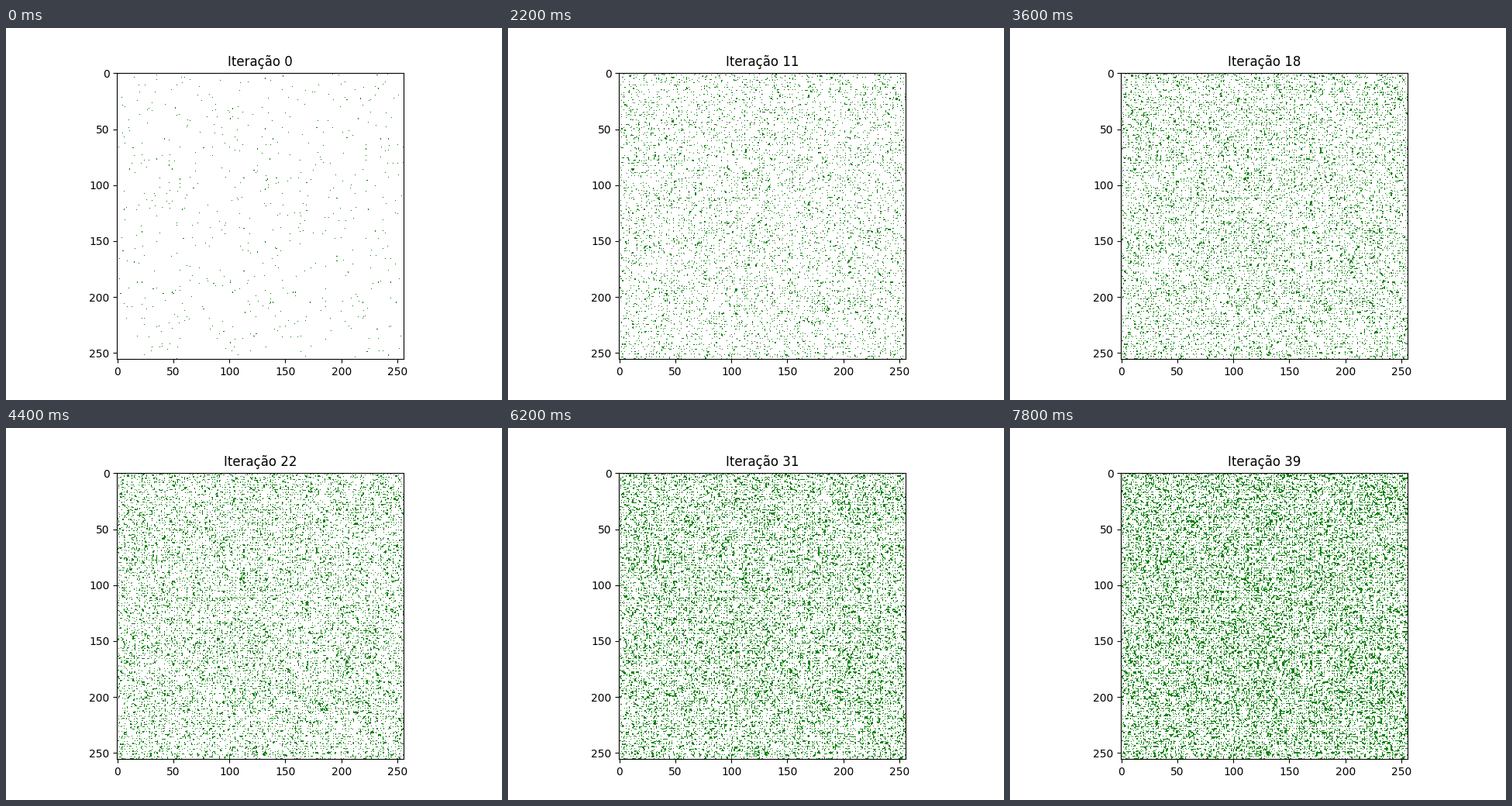
Write a matplotlib script that moves like this. It is 640 by 480 pixels and loops after 8000 ms.

```python
import numpy as np
import matplotlib.pyplot as plt
from matplotlib.animation import FuncAnimation
from matplotlib.colors import ListedColormap

SIZE = 256
STEPS = 40
STEP_MS = 200
SPROUT = 0.01  # chance per step that an empty cell fills
CUTOFF = 4 / 3  # upper colour limit: only cell cores are inked

rng = np.random.default_rng(21)
birth = rng.geometric(SPROUT, (SIZE, SIZE)) - 1

fig, ax = plt.subplots(figsize=(6.4, 4.8), dpi=100)


def layer(base, ink):
    """Image layer with two flat colours."""
    return ax.imshow(np.zeros((SIZE, SIZE)), cmap=ListedColormap([base, ink]),
                     vmin=0, vmax=CUTOFF)


grown = layer("white", "green")
fresh = layer((0, 0, 0, 0), "#4b3a4d")
title = ax.set_title("Iteração 0")


def draw(step):
    new = (birth == step) & (step > 0)
    grown.set_data(((birth <= step) & ~new).astype(float))
    fresh.set_data(new.astype(float))
    title.set_text(f"Iteração {step}")
    return grown, fresh, title


anim = FuncAnimation(fig, draw, frames=STEPS, init_func=lambda: draw(0),
                     interval=STEP_MS, repeat=True, repeat_delay=0)
plt.show()
```
